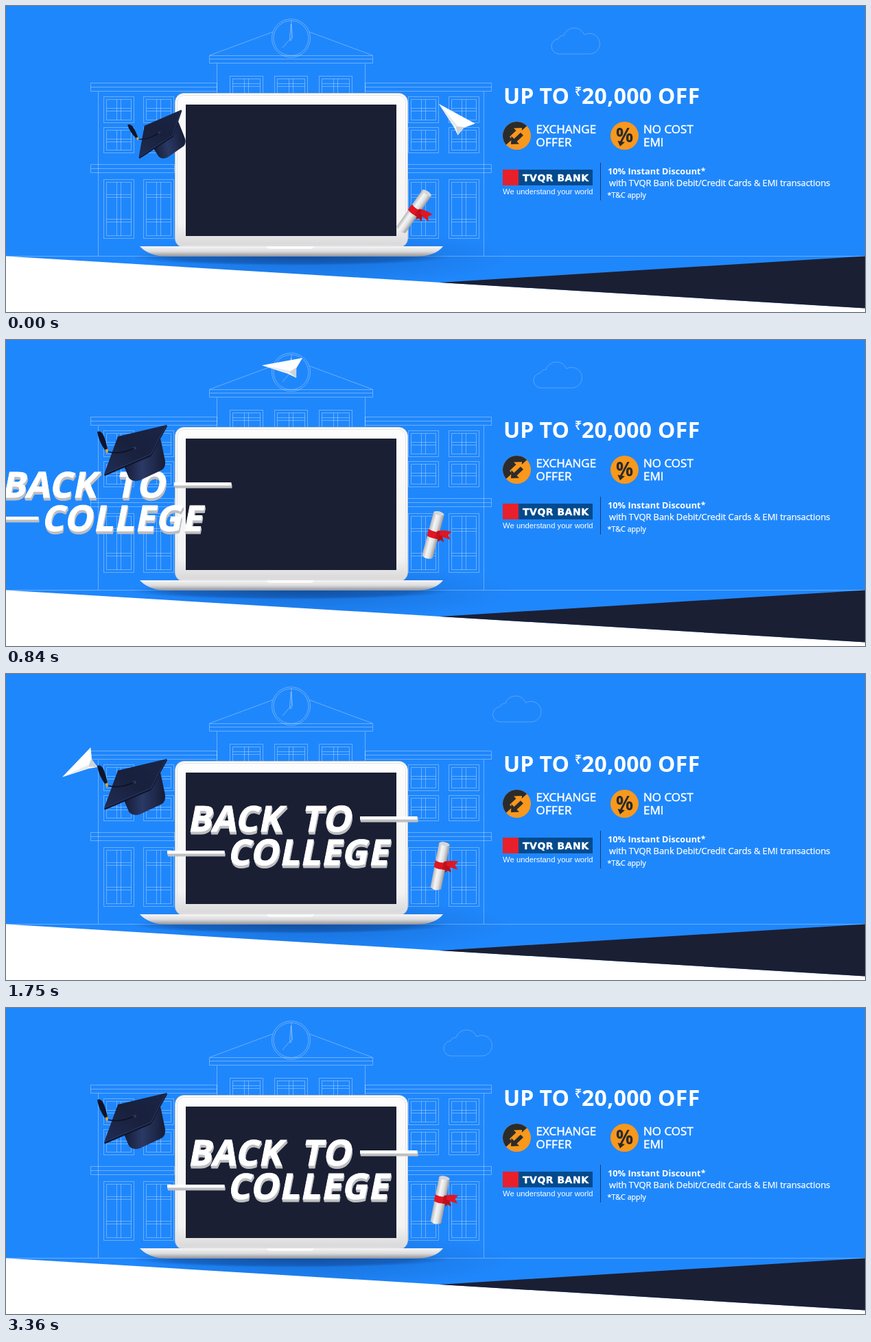
An HTML page for the animation above (8000 ms loop, 1252 px wide and 447 px high).

```html
<!DOCTYPE html>
<html lang="en">
<head>
<meta charset="utf-8">
<title>Back to college</title>
<style>
  html, body { margin: 0; width: 100%; height: 100%; overflow: hidden; background: #1f87fc; }
  svg { display: block; width: 100%; height: 100%; }
  text { font-family: "Open Sans", "Noto Sans", sans-serif; white-space: pre; }
  .line { fill: none; stroke: #fff; stroke-opacity: .33; stroke-width: 1; }
  .copy { fill: #fff; stroke: #fff; stroke-width: 0; }
  .bold { font-weight: 700; }
  .mid { font-size: 17px; stroke-width: .5px; }
  .small { stroke-width: .25px; }
</style>
</head>
<body>
<svg viewBox="0 0 1252 447" xmlns="http://www.w3.org/2000/svg">
  <defs>
    <linearGradient id="lid" x2="0" y2="1">
      <stop offset="0" stop-color="#fdfdfd"/><stop offset=".85" stop-color="#f3f3f3"/><stop offset="1" stop-color="#d6d6d8"/>
    </linearGradient>
    <linearGradient id="base" x2="0" y2="1">
      <stop offset="0" stop-color="#f6f6f6"/><stop offset=".5" stop-color="#dcdcde"/><stop offset="1" stop-color="#8f9298"/>
    </linearGradient>
    <linearGradient id="paper">
      <stop offset="0" stop-color="#b4b5b8"/><stop offset=".35" stop-color="#f6f6f6"/>
      <stop offset=".65" stop-color="#dfdfe1"/><stop offset="1" stop-color="#97999e"/>
    </linearGradient>
    <linearGradient id="board" x1="0" y1="1" x2="1" y2="0">
      <stop offset="0" stop-color="#202d55"/><stop offset=".5" stop-color="#18203c"/><stop offset="1" stop-color="#1a2547"/>
    </linearGradient>
    <linearGradient id="skull">
      <stop offset="0" stop-color="#141a33"/><stop offset=".45" stop-color="#2a3965"/><stop offset="1" stop-color="#161c36"/>
    </linearGradient>
    <radialGradient id="shade">
      <stop offset="0" stop-color="#0b3a80" stop-opacity=".6"/><stop offset=".75" stop-color="#0b3a80" stop-opacity=".4"/>
      <stop offset="1" stop-color="#0b3a80" stop-opacity="0"/>
    </radialGradient>
    <radialGradient id="haze">
      <stop offset="0" stop-color="#0b3a80" stop-opacity=".28"/><stop offset="1" stop-color="#0b3a80" stop-opacity="0"/>
    </radialGradient>
    <clipPath id="leftOfScreen"><rect width="262" height="447"/></clipPath>
    <clipPath id="rightOfScreen"><rect x="569" width="683" height="447"/></clipPath>
    <clipPath id="disc"><circle cx="744.5" cy="189.5" r="20.5"/></clipPath>
    <g id="headline" font-size="52" font-weight="700">
      <g stroke-width="1">
        <text transform="translate(264.5 230) skewX(-11)" letter-spacing=".3">BACK</text>
        <text transform="translate(430 230) skewX(-11)" letter-spacing="2">TO</text>
        <text transform="translate(322.5 279) skewX(-11)" letter-spacing="1">COLLEGE</text>
      </g>
      <rect x="516" y="208" width="83.5" height="4.5" stroke="none"/>
      <rect x="235" y="258" width="83.5" height="4.5" stroke="none"/>
    </g>
  </defs>

  <rect width="1252" height="447" fill="#1f87fc"/>
  <path id="building" class="line"/>
  <circle class="line" cx="415.5" cy="47" r="28"/>
  <circle class="line" cx="415.5" cy="47" r="25.500"/>
  <path class="line" d="M416 21V46L403 61M413.500 46l2-20 2 20-3 5z"/>
  <path id="cloud" class="line" style="stroke-opacity:.24" d="M12 70A11 11 0 0 1 10 48A9 9 0 0 1 18 43A16 16 0 0 1 48 42A15 15 0 1 1 56 70Z"/>

  <ellipse cx="460" cy="368" rx="280" ry="42" fill="url(#haze)"/>
  <ellipse cx="416" cy="367" rx="232" ry="12" fill="url(#shade)"/>
  <path d="M0 365.500L1252 441.500V447H0Z" fill="#fff"/>
  <path d="M632 404L1252 365.500V441.500Z" fill="#1b1f33"/>

  <g id="plane">
    <path d="M0 0L60 0L48 14L46 27L35 19Z" fill="#fff"/>
    <path d="M37 17L46 27L49 12Z" fill="#ccd3dc"/>
    <path d="M0 0L35 19L39 15Z" fill="#e6ebf0"/>
  </g>

  <rect x="246.5" y="127.5" width="339" height="225" rx="13" fill="url(#lid)" stroke="#c9cbd0"/>
  <rect x="249.5" y="130.5" width="333" height="219" rx="10" fill="none" stroke="#e3e3e5"/>
  <rect x="262" y="144" width="307" height="192" fill="#1b1f33"/>
  <path d="M195 351H637C630 361 614 366 598 366H234C218 366 203 360 195 351Z" fill="url(#base)"/>
  <path d="M380 351H449Q448 354.500 444 354.500H385Q381 354.500 380 351Z" fill="#fff"/>

  <g clip-path="url(#rightOfScreen)">
    <g id="scroll">
      <path d="M-8 -33Q0 -38 8 -33V33Q0 38 -8 33Z" fill="url(#paper)"/>
      <ellipse cy="-33" rx="7.500" ry="2.600" fill="#d5d6d9"/>
      <path d="M5 -8L15 -11L25 -12L21 -6L26 0L16 -1L6 1Z" fill="#e01622"/>
      <path d="M6 -3L13 -2L18 6L12 4L9 8Z" fill="#b80f1b"/>
      <path d="M-8.500 -7Q0 -4 8.500 -7V3Q0 6 -8.500 3Z" fill="#e01622"/>
      <path d="M4 -7L9 -8V4L4 4Z" fill="#c2101c"/>
    </g>
  </g>

  <g id="title">
    <g fill="#bdbfc2" stroke="#bdbfc2" id="depth"></g>
    <use href="#headline" fill="#fff" stroke="#fff"/>
  </g>

  <g clip-path="url(#leftOfScreen)">
    <g id="cap">
      <path d="M171 182L179 201Q184 208 195 205L227 190Q233 186 232 177L225 143L180 172Z" fill="url(#skull)"/>
      <path d="M234 124L143 196L144 198.500L211 170L235 126Z" fill="#0f1429"/>
      <path d="M234 124L163 141L143 196L211 167Z" fill="url(#board)"/>
      <path d="M143 196L211 167L234 124" fill="none" stroke="#33467c" stroke-width=".8"/>
      <ellipse cx="187" cy="158" rx="3" ry="2" fill="#2b3a68"/>
      <path d="M187 158Q166 168 148 163" fill="none" stroke="#0d1122" stroke-width="1.600"/>
      <path d="M133 134Q138 132 142 139Q146 148 148 160L145 162Q135 148 133 134Z" fill="#10152a"/>
      <path d="M144.500 160L148.500 159L149 164L146 165Z" fill="#d9a441"/>
    </g>
  </g>

  <g class="copy">
    <g class="bold" font-size="32">
      <text x="725" y="143">UP TO</text>
      <text x="829" y="131" font-size="18" font-weight="400" stroke-width=".5">₹</text>
      <text x="839" y="143" letter-spacing=".3">20,000 OFF</text>
    </g>
    <text class="mid" x="772.500" y="186">EXCHANGE</text>
    <text class="mid" x="772.500" y="205" letter-spacing=".3">OFFER</text>
    <text class="mid" x="929" y="186">NO COST</text>
    <text class="mid" x="929" y="205">EMI</text>
    <text class="bold" x="877" y="246" font-size="12.800">10% Instant Discount*</text>
    <text class="small" x="879" y="263" font-size="13" letter-spacing="-.11">with TVQR Bank Debit/Credit Cards &amp; EMI transactions</text>
    <text class="small" x="876.500" y="280" font-size="10.700">*T&amp;C apply</text>
  </g>

  <g clip-path="url(#disc)">
    <rect x="724" y="169" width="41" height="41" fill="#f8981d"/>
    <path d="M722 209L767 168H722Z" fill="#2c2b2b"/>
    <path d="M752 178L740 178.500L743.500 182L734 191L738 195L747.500 186L751.500 190Z" fill="#f8981d"/>
    <path d="M736 202L748 201.500L744.500 198L754 189L750 185L740.500 194L736.500 190Z" fill="#2c2b2b"/>
  </g>
  <circle cx="901.500" cy="189.500" r="20.500" fill="#f8981d"/>
  <text class="bold" x="901.500" y="199" font-size="28" text-anchor="middle" fill="#2c2b2b">%</text>
  <path d="M891.500 197L902 199L895 205Z" fill="#2c2b2b"/>

  <rect x="746" y="239" width="109" height="23" fill="#034a8d"/>
  <rect x="724" y="239" width="23" height="23" fill="#e8202b"/>
  <text class="copy bold" x="753" y="255.500" font-size="14" letter-spacing=".5" style="font-family:'DejaVu Sans',sans-serif;stroke-width:.4px">TVQR BANK</text>
  <text class="copy" x="724" y="275" font-size="11.300" style="font-family:'Liberation Sans',Arial,sans-serif">We understand your world</text>
  <path d="M866.500 229V284" stroke="#173f78"/>
</svg>

<script>
const LOOP = 8000, STEP = 70, REST = 3360;
const $ = id => document.getElementById(id);

// Each key: time, then one value per animated property.
const cloudKeys = [[0, 795], [560, 782.5], [840, 769], [1120, 752], [1400, 733.5],
  [1680, 714.5], [2240, 675.5], [2520, 660], [REST, 638]];
const planeKeys = [[0, 631, 143, 28.5], [560, 423, 37, -4], [840, 373, 37, -10.4],
  [1120, 288, 46, -23.6], [1400, 206, 90, -37], [1680, 108, 139, -45],
  [1960, 0, 185, -50], [2240, -120, 235, -54]];
const scrollKeys = [[0, 594.5, 300, 35], [560, 611, 291, 23.5], [840, 622.5, 285, 15],
  [1120, 632, 281, 11.5], [1400, 632.7, 280.7, 11]];
const capKeys = [[0, 224, 186.5, -10, .8], [560, 190, 161, -.8, .99], [840, 188, 160, 0, 1]];

// Monotone cubic interpolation, settling to rest at the last key.
function track(keys, t) {
  const last = keys.length - 1;
  if (t >= keys[last][0]) return keys[last].slice(1);
  const i = keys.findIndex((k, n) => n < last && t < keys[n + 1][0]);
  const h = keys[i + 1][0] - keys[i][0], u = (t - keys[i][0]) / h;
  return keys[i].slice(1).map((_, c) => {
    c += 1;
    const secant = n => (keys[n + 1][c] - keys[n][c]) / (keys[n + 1][0] - keys[n][0]);
    const slope = n => {
      if (n === last) return 0;
      if (n === 0) return 1.5 * secant(0) - .5 * slope(1);
      const a = secant(n - 1), b = secant(n);
      return a * b > 0 ? 2 * a * b / (a + b) : 0;
    };
    const p = keys[i][c], q = keys[i + 1][c], w = 1 - u;
    return p * w * w * (1 + 2 * u) + q * u * u * (3 - 2 * u)
      + h * u * w * (w * slope(i) - u * slope(i + 1));
  });
}

const rect = (x, y, w, h) => `M${x} ${y}h${w}v${h}h${-w}z`;
const hline = (x1, x2, y) => `M${x1} ${y}H${x2}`;
const vline = (x, y1, y2) => `M${x} ${y1}V${y2}`;

function pane(x, y, w, h, bars) {
  const mid = x + w / 2;
  let d = rect(x, y, w, h) + rect(x + 4, y + 4, w - 8, h - 8)
    + vline(mid - 3, y + 4, y + h - 4) + vline(mid + 3, y + 4, y + h - 4);
  for (const b of bars) d += hline(x + 4, x + w - 4, y + b) + hline(x + 4, x + w - 4, y + b + 4);
  return d;
}

function wing(left, far) {
  const roof = left ? 123.5 : 523.5, ledge = left ? 123.5 : 585.5;
  let d = rect(roof, 112.5, 184, 12) + hline(roof, roof + 184, 118.5)
    + rect(ledge, 231.5, 122, 12) + hline(ledge, ledge + 122, 237.5)
    + vline(far, 125, 365);
  for (const x of left ? [142.5, 200.5] : [586.5, 645.5]) {
    d += pane(x, 132.5, 44, 38, [17]) + pane(x, 177.5, 44, 37, [17])
      + pane(x, 253.5, 44, 86, [22, 58]);
  }
  return d;
}

$('building').setAttribute('d',
  hline(0, 1252, 365.5) + rect(296.5, 72.5, 238, 11) + hline(297, 534, 77.5)
  + 'M297 72L388.500 38M442.500 38L534 72'
  + vline(307.5, 84, 128) + vline(523.5, 84, 128)
  + [326.5, 391.5, 456.5].map(x => pane(x, 102.5, 48, 44, [11])).join('')
  + wing(true, 134.5) + wing(false, 696.5));

$('depth').innerHTML = [4, 3, 2, 1].map(n =>
  `<use href="#headline" x="${n / 4}" y="${n}"/>`).join('');

const place = (id, value) => $(id).setAttribute('transform', value);

function draw(time) {
  const t = Math.min(Math.floor(time / STEP) * STEP, REST);

  const slide = Math.min(t / 1562, 1);
  place('title', `translate(${-307.5 * (1 + Math.cos(Math.PI * slide))} 0)`);

  place('cloud', `translate(${track(cloudKeys, t)[0]} 0)`);

  const [px, py, pr] = track(planeKeys, t);
  place('plane', `translate(${px} ${py}) rotate(${pr})`);

  const [sx, sy, sr] = track(scrollKeys, t);
  place('scroll', `translate(${sx} ${sy}) rotate(${sr})`);

  const [cx, cy, cr, cs] = track(capKeys, t);
  place('cap', `translate(${cx} ${cy}) rotate(${cr}) scale(${cs}) translate(-188 -160)`);
}

const start = performance.now();
function tick() {
  draw((performance.now() - start) % LOOP);
  requestAnimationFrame(tick);
}
tick();
</script>
</body>
</html>
```
